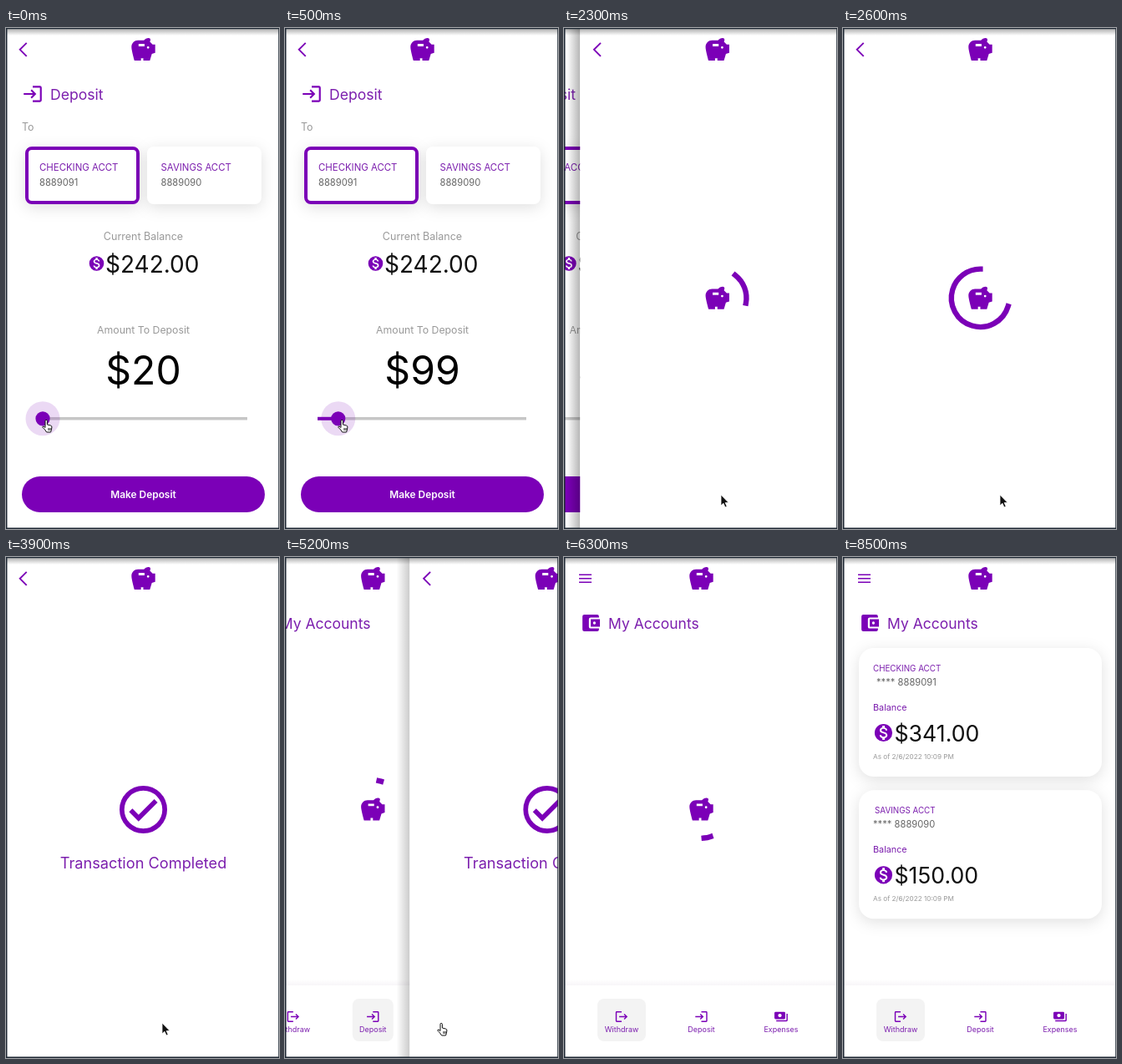
An HTML page for the animation above (8700 ms loop, 327 by 600 pixels).

```html
<!DOCTYPE html>
<html lang="en">
<head>
<meta charset="utf-8">
<title>Deposit flow</title>
<style>
  html, body { margin: 0; width: 100%; height: 100%; overflow: hidden; background: #fff; }
  svg { display: block; width: 100vw; height: 100vh; }
  text { font-family: Poppins, Inter, Roboto, sans-serif; white-space: pre; }
  .lift { filter: drop-shadow(0 4px 9px rgba(0, 0, 0, .12)); }
</style>
</head>
<body>
<svg id="stage" viewBox="0 0 327 600" preserveAspectRatio="none"></svg>
<script>
const LOOP = 8700, W = 327, H = 600;
const PUSH = 2136, DONE = 2700, POP = 5148, LOADED = 6600, SLIDE = 300;
const PURPLE = '#7b00b7', INK = '#7c1fae', GRAY = '#999', DARK = '#666', BLACK = '#111';

const ICONS = {
  pig: 'M15 10a1 1 0 1 1 2 0a1 1 0 1 1-2 0M8 9H13V7H8V9M22 7.5V14.47L19.18 15.41L17.5 21H12V19H10V21H4.5C4.5 21 2 12.54 2 9.5C2 6.46 4.46 4 7.5 4H12.5C13.41 2.79 14.86 2 16.5 2C17.33 2 18 2.67 18 3.5Q18 3.8 17.88 4.08Q17.65 4.6 17.56 5.23L19.83 7.5Z',
  login: 'M11 7L9.6 8.4l2.6 2.6H2v2h10.2l-2.6 2.6L11 17l5-5zM20 19h-8v2h8q2 0 2-2V5q0-2-2-2h-8v2h8z',
  logout: 'M17 7l-1.4 1.4 2.6 2.6H8v2h10.2l-2.6 2.6L17 17l5-5zM4 5h8V3H4Q2 3 2 5v14q0 2 2 2h8v-2H4z',
  wallet: 'M21 18v1q0 2-2 2H5q-2 0-2-2V5q0-2 2-2h14q2 0 2 2v1h-9q-2 0-2 2v8q0 2 2 2zM12 16h10V8H12zM14.5 12a1.5 1.5 0 1 1 3 0a1.5 1.5 0 1 1-3 0',
  notes: 'M19 14V6q0-2-2-2H3Q1 4 1 6v8q0 2 2 2h14q2 0 2-2zM7 10a3 3 0 1 1 6 0a3 3 0 1 1-6 0M23 7v11q0 2-2 2H4v-2h17V7z',
  coin: 'M2 12a10 10 0 1 1 20 0a10 10 0 1 1-20 0M13.4 18.1V20h-2.7v-1.9c-1.7-.4-3.1-1.5-3.2-3.4h2c.1 1 .8 1.8 2.6 1.8 2 0 2.4-1 2.4-1.6 0-.8-.4-1.6-2.7-2.1-2.4-.6-4.1-1.6-4.1-3.7 0-1.7 1.3-2.8 3-3.2V4h2.7v2c1.9.4 2.8 1.8 2.9 3.3h-2c0-1.1-.6-1.8-2.2-1.8-1.5 0-2.4.6-2.4 1.6 0 .8.6 1.4 2.7 1.9s4.1 1.4 4.1 3.9c0 1.9-1.4 3-3.1 3.2z'
};

const icon = (name, cx, cy, k) =>
  `<path d="${ICONS[name]}" fill="${PURPLE}" fill-rule="evenodd" transform="translate(${cx - 12 * k} ${cy - 12 * k}) scale(${k})"/>`;
const text = (x, y, size, str, fill = INK, anchor = 'start', weight = 400) =>
  `<text x="${x}" y="${y}" font-size="${size}" fill="${fill}" text-anchor="${anchor}" font-weight="${weight}">${str}</text>`;
const mid = (y, size, str, fill, weight) => text(164.5, y, size, str, fill, 'middle', weight);
const rect = (x, y, w, h, r, attrs) => `<rect x="${x}" y="${y}" width="${w}" height="${h}" rx="${r}" ${attrs}/>`;
const line = (d, w) => `<path d="${d}" fill="none" stroke="${PURPLE}" stroke-width="${w}"/>`;

const clamp = v => Math.max(0, Math.min(1, v));

function bezier(x1, y1, x2, y2) {
  const at = (a, b, s) => 3 * (1 - s) ** 2 * s * a + 3 * (1 - s) * s * s * b + s ** 3;
  return u => {
    u = clamp(u);
    let lo = 0, hi = 1;
    for (let i = 0; i < 24; i++) {
      const m = (lo + hi) / 2;
      if (at(x1, x2, m) < u) lo = m; else hi = m;
    }
    return at(y1, y2, (lo + hi) / 2);
  };
}
const slideEase = bezier(.35, .91, .33, .97);
const arcEase = bezier(.4, 0, .2, 1);
const moveEase = bezier(.4, 0, .6, 1);

// Keys are [time, ...values]; eases between neighbours.
function track(keys, t) {
  const i = keys.findIndex(k => k[0] > t);
  if (i === 0) return keys[0].slice(1);
  if (i < 0) return keys[keys.length - 1].slice(1);
  const a = keys[i - 1], b = keys[i];
  const u = moveEase((t - a[0]) / (b[0] - a[0]));
  return a.slice(1).map((v, n) => v + (b[n + 1] - v) * u);
}

const blank = rect(0, 0, W, H, 0, 'fill="#fff"');
const logo = icon('pig', 164.5, 26.2, 1.42);
const back = line('M24.7 17.8L16.7 25.8L24.7 33.8', 1.9);

function spinner(t, cy) {
  const turn = t / 1333 % 1;
  const head = arcEase(turn * 2) * 270, tail = arcEase(turn * 2 - 1) * 270;
  const start = -90 + tail + t / 2222 * 360 + turn * 90;
  const sweep = Math.max(head - tail, .1);
  return icon('pig', 164.5, cy + .6, 1.42) +
    `<circle cx="164.5" cy="${cy}" r="34.7" fill="none" stroke="${PURPLE}" stroke-width="6.4" stroke-linecap="square"
      pathLength="360" stroke-dasharray="${sweep} 720" transform="rotate(${start} 164.5 ${cy})"/>`;
}

const account = (x, name, number) => text(x, 171, 11.4, name) + text(x, 189, 11.2, number, DARK);

const depositStatic = blank + logo + back +
  icon('login', 32, 79, 1.08) + text(53, 85.5, 17.6, 'Deposit') +
  text(19, 123, 12.4, 'To', GRAY) +
  rect(23, 142, 137, 69, 8, 'fill="#fff" class="lift"') +
  rect(25, 144, 133, 65, 6, `fill="#fff" stroke="${PURPLE}" stroke-width="4"`) +
  rect(169, 142, 137, 69, 8, 'fill="#fff" class="lift"') +
  account(40, 'CHECKING ACCT', '8889091') + account(185.5, 'SAVINGS ACCT', '8889090') +
  mid(254, 12.5, 'Current Balance', GRAY) +
  icon('coin', 108.5, 282, .88) + text(119, 292.5, 28, '$242.00', BLACK) +
  mid(366, 12.3, 'Amount To Deposit', GRAY) +
  rect(19, 537, 291, 43, 21.5, `fill="${PURPLE}"`) +
  mid(563, 11.9, 'Make Deposit', '#fff', 600);

function depositPage(t) {
  const [amount] = track([[100, 20], [500, 99]], t);
  const x = 39 + amount / 4;
  const halo = .15 * (1 - clamp((t - 550) / 100));
  return depositStatic + mid(427, 48, '$' + Math.round(amount), '#000') +
    `<path d="M39 467.8H289" stroke="#c6c6c6" stroke-width="3.5"/>` + line(`M39 467.8H${x}`, 4) +
    `<circle cx="${x}" cy="467.8" r="20.5" fill="${PURPLE}" opacity="${halo}"/>` +
    `<circle cx="${x}" cy="467.8" r="8.6" fill="${PURPLE}"/>`;
}

const doneMark =
  `<g transform="translate(130.3 268.3) scale(2.85)">
    <circle cx="12" cy="12" r="9" fill="none" stroke="${PURPLE}" stroke-width="2"/>
    ${line('M6.7 12.3L10 15.6L17.3 8.3', 2)}</g>` + mid(373, 18.2, 'Transaction Completed');

const resultPage = t => blank + logo + back + (t < DONE ? spinner(t - PUSH, 323.3) : doneMark);

const balanceCard = (y, nameX, name, numX, number, sum) =>
  `<g transform="translate(0 ${y})">` +
  rect(19, 0, 291, 154, 18, 'fill="#fff" class="lift"') +
  text(nameX, 28, 9.8, name) + text(numX, 45, 11.2, '**** ' + number, DARK) +
  text(36, 75, 10.8, 'Balance') +
  icon('coin', 48.5, 101.5, 1.06) + text(61.5, 111.5, 26.7, sum, BLACK) +
  text(36, 133, 8.2, 'As of 2/6/2022 10:09 PM', GRAY) + '</g>';

const cards =
  balanceCard(109, 36, 'CHECKING ACCT', 40, '8889091', '$341.00') +
  balanceCard(279.3, 38, 'SAVINGS ACCT', 36, '8889090', '$150.00');

const navItem = (x, name, label) => icon(name, x, 550.5, .72) + text(x, 568.5, 9, label, INK, 'middle');
const nav = navItem(69, 'logout', 'Withdraw') + navItem(164.5, 'login', 'Deposit') + navItem(260, 'notes', 'Expenses');

function homePage(t, cursorX) {
  let hover = '';
  const shade = 'fill="#f3f3f3"';
  if (cursorX < 98) hover = rect(40, 529, 58, 51, 8, shade);
  else if (cursorX > 139 && cursorX < 190) hover = rect(140, 529, 49, 51, 8, shade);
  return blank + logo + line('M18 21.2H33M18 25.7H33M18 30.2H33', 1.6) +
    icon('wallet', 32, 79, 1.1) + text(53, 85.5, 17.5, 'My Accounts') +
    (t < LOADED ? spinner(t - POP, 302) : cards) +
    rect(0, 506, W, 7, 0, 'fill="url(#navShade)"') + hover + nav;
}

const cursorKeys = [
  [100, 48, 469], [500, 68, 469], [900, 188, 549], [1500, 188, 549], [1900, 188, 559],
  [3300, 188, 559], [3900, 187, 558], [5200, 187, 558], [5300, 188, 559], [5500, 188, 559], [6000, -15, 566]
];

function cursor(t, x, y) {
  const hand = t < 550 || t > 5200 && (x > 139 || x > 40 && x < 98);
  return hand
    ? `<path d="M4 9.5V1.6a1.2 1.2 0 0 1 2.4 0V6l4.2 1.1q1.4.4 1.3 1.9l-.5 3.6-.9 2.4H5.6L3.6 12 .9 9.3Q.6 8 2 8zM8 10v3M10 10v3"
        fill="#fff" stroke="#111" stroke-width="1" transform="translate(${x - 5} ${y})"/>`
    : `<path d="M0 0V13L3 10.3L5 15L7.2 14L5.2 9.6H9.2Z"
        fill="#111" stroke="#fff" stroke-width=".8" transform="translate(${x} ${y})"/>`;
}

const defs = `<defs>
  <linearGradient id="edge"><stop stop-opacity="0"/><stop offset="1" stop-opacity=".3"/></linearGradient>
  <linearGradient id="topShade" x2="0" y2="1"><stop stop-opacity=".35"/><stop offset="1" stop-opacity="0"/></linearGradient>
  <linearGradient id="navShade" x2="0" y2="1"><stop stop-color="#806090" stop-opacity="0"/>
    <stop offset="1" stop-color="#806090" stop-opacity=".06"/></linearGradient>
</defs>`;
const frame = rect(0, 0, W, 9, 0, 'fill="url(#topShade)"') +
  `<path d="M0 .6H327M.7 0V600M0 599.2H327" stroke="#1d2733" stroke-width="1.5"/>
   <path d="M326.6 0V600" stroke="#1d2733" stroke-width=".8"/>`;

// The upper page sits at x, its shadow fading as it leaves; the lower one trails at a third of its distance.
const stack = (lower, upper, x) =>
  `<g transform="translate(${(x - W) / 3} 0)">${lower}</g>
   <g transform="translate(${x} 0)">${rect(-16, 0, 16, H, 0, `fill="url(#edge)" opacity="${1 - .7 * x / W}"`)}${upper}</g>`;

function scene(t, cursorX) {
  if (t < PUSH) return depositPage(t);
  if (t < PUSH + SLIDE) return stack(depositPage(t), resultPage(t), W * (1 - slideEase((t - PUSH) / SLIDE)));
  if (t < POP) return resultPage(t);
  const home = homePage(t, cursorX);
  return t < POP + SLIDE ? stack(home, resultPage(t), W * slideEase((t - POP) / SLIDE)) : home;
}

const stage = document.getElementById('stage');
function draw() {
  const t = performance.now() % LOOP;
  const [x, y] = track(cursorKeys, t);
  stage.innerHTML = defs + scene(t, x) + frame + cursor(t, x, y);
  requestAnimationFrame(draw);
}
draw();
</script>
</body>
</html>
```
